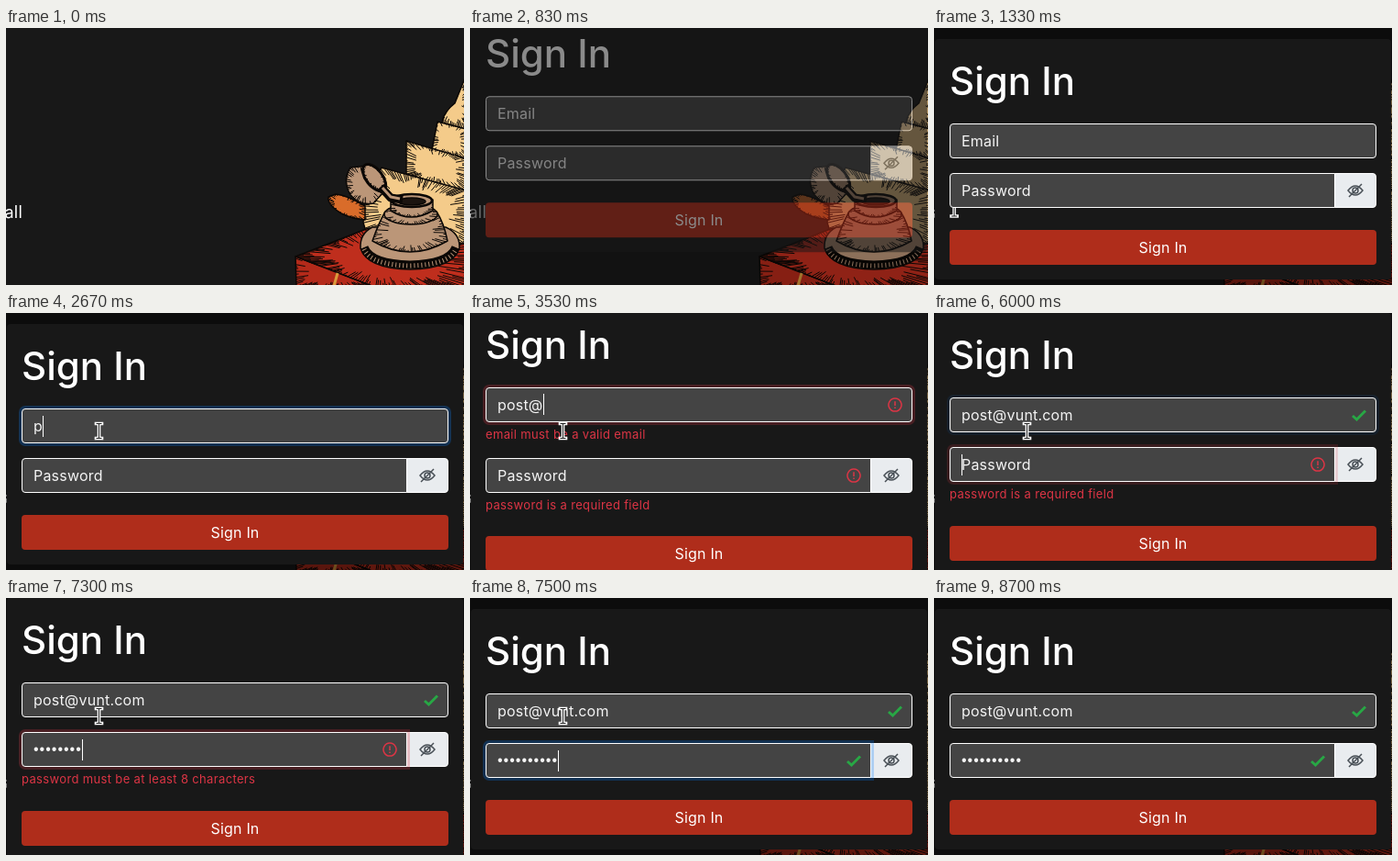
Recreate the animation shown at these times as an HTML page. Size 500 by 280 pixels, loop 9.13 s.

```html
<!DOCTYPE html>
<html lang="en">
<head>
<meta charset="utf-8">
<title>Sign In</title>
<style>
* { box-sizing: border-box; margin: 0 }
html, body { width: 100%; height: 100%; overflow: hidden; background: #181818 }
body { position: relative; font: 16px/24px Inter, sans-serif; letter-spacing: .2px; color: #f4f4f4 }
svg { display: block }
#art, #shade, #cursor { position: absolute; left: 0; top: 0 }
#all { position: absolute; right: calc(100% - 18px); top: 189px; font-size: 18px; color: #fff }
#shade { width: 500px; height: 280px; background: #000 }
#panel { position: absolute; left: 1px; width: 498px; padding: 0 16px 16px; background: #181818; border-radius: 4px }
h1 { font-size: 42px; font-weight: 500; line-height: 92px; letter-spacing: 0; color: #fff }
.field { position: relative; height: 38px; padding-left: 12px; display: flex; align-items: center;
  background: #444; border: 1px solid #fff; border-radius: 4px }
.field i { width: 1px; height: 23px; margin-right: -1px; background: #fff }
.field svg { position: absolute; top: 10px; right: 10px }
.empty i { order: -1 }
.row { display: flex }
.row .field { width: 421px; border-radius: 4px 0 0 4px; z-index: 1 }
#pass:not(.empty) span { font-family: "Liberation Sans", sans-serif; letter-spacing: 1px }
.eye { width: 46px; height: 38px; margin-left: -1px; padding: 8px 12px; background: #e9ecef;
  border: 1px solid #fff; border-radius: 0 4px 4px 0 }
.error { margin-top: 4px; font-size: 13px; line-height: 19.2px; letter-spacing: .35px; color: #dc3545 }
.gap { height: 16px }
button { display: block; width: 466px; height: 38px; margin-top: 24px; border: 0; border-radius: 4px;
  background: #af2d1b; color: #fff; font: inherit; letter-spacing: inherit }
</style>
</head>
<body>
<svg id="art" width="500" height="280" fill="none" stroke="#0b0806" stroke-width="1.5" stroke-linejoin="round">
  <g fill="#f4cb8a">
    <path class="ink" d="M502 52L490 82Q478 91 476 103L502 110Z"/>
    <path class="ink" d="M471 102L502 110V142L465 133Z"/>
    <path class="ink" d="M437 123L502 142V178L437 159Z"/>
    <path class="ink" d="M410 152L502 177V245H400L390 212L392 186Z"/>
  </g>
  <path class="ink" fill="#d96c2a" d="M352 184Q350 192 366 202Q378 208 392 209V194Q372 182 360 181Z"/>
  <path class="ink" fill="#bf2e1d" d="M316 249L396 218L502 235V282H402Z"/>
  <path class="ink" fill="#b42a1a" d="M316 249L402 282H317Z"/>
  <path stroke="#d99a3c" stroke-width="3" d="M362 267L358 281"/>
  <g fill="#bb9678">
    <path d="M400 217Q386 224 387 240Q394 262 441 263Q488 262 495 240Q496 224 480 217Z"/>
    <path stroke-width="9" d="M391 239Q398 257 441 258Q484 257 491 239"/>
    <path fill="none" stroke="#bb9678" stroke-width="5" stroke-dasharray="1 3" d="M391 241Q398 258 441 259Q484 258 491 241"/>
    <path class="ink" d="M414 200Q407 212 400 232Q441 256 482 232Q478 212 470 200Z"/>
    <ellipse class="ink" cx="442" cy="203" rx="29" ry="11"/>
    <path class="ink" d="M420 187V199Q442 213 466 199V187Z"/>
    <ellipse cx="443" cy="188" rx="22" ry="7" stroke-width="2.5"/>
    <ellipse cx="443" cy="189" rx="15" ry="4" fill="#1b1410"/>
    <path class="ink" d="M395 150L376 152Q367 166 376 182Q387 194 401 191L413 178Z"/>
    <ellipse class="ink" cx="402" cy="163" rx="9" ry="17" stroke-width="3" transform="rotate(-38 402 163)"/>
  </g>
  <path stroke-width="9" d="M409 173L420 185L433 187"/>
  <path stroke="#bb9678" stroke-width="3" d="M411 174L420 184L430 186"/>
</svg>
<div id="all">all</div>
<div id="shade"></div>
<div id="panel">
  <h1>Sign In</h1>
  <div class="field" id="mail"><span></span><i></i><svg width="16" height="16" fill="none"><path/></svg></div>
  <div class="error" id="mailError">email must be a valid email</div>
  <div class="gap"></div>
  <div class="row">
    <div class="field" id="pass"><span></span><i></i><svg width="16" height="16" fill="none"><path/></svg></div>
    <div class="eye"><svg width="20" height="20" fill="none" stroke="#495057" stroke-width="1.5">
      <path d="M2 10Q10 0 18 10Q10 20 2 10ZM3 17L17 3"/><circle cx="10" cy="10" r="3"/></svg></div>
  </div>
  <div class="error" id="passError"></div>
  <button>Sign In</button>
</div>
<svg id="cursor" width="500" height="280"><g id="beam">
  <path d="M-3 -8H3M0 -8V8M-3 8H3" stroke="#fff" stroke-width="3.6" stroke-linecap="square"/>
  <path d="M-3 -8H3M0 -8V8M-3 8H3" stroke="#222"/>
</g></svg>
<script>
const LOOP = 9130, ADDRESS = "post@vunt.com";
// Moments of the story, in ms
const OPEN = 755, MOVE = 1330, CLICK = 1870, CHECKED = 2700, MAIL_OK = 4930,
  NEXT = 5900, PASS_OK = 7330, SEND = 8330, REOPEN = 8400;
const CHECK = "M1 9L5.5 13L15 3.5", ALERT = "M8 1A7 7 0 1 1 7.99 1M8 4.2V9M8 10.6V12";

const el = id => document.getElementById(id);
const clamp = (v, lo, hi) => Math.min(hi, Math.max(lo, v));
const ramp = (t, from, span = 150) => clamp((t - from) / span, 0, 1);
const easeOut = (x, power) => 1 - (1 - x) ** power;
const within = (t, a, b) => t >= a && t < b;
const keys = (t, from, step, count) => clamp(Math.floor((t - from) / step) + 1, 0, count);

// Ink shading: uneven strokes from each outline towards the middle
let seed = 7;
const rand = () => (seed = seed * 16807 % 2147483647) / 2147483647;
for (const shape of document.querySelectorAll(".ink")) {
  const box = shape.getBBox(), hatch = shape.cloneNode();
  const cx = box.x + box.width / 2, cy = box.y + box.height / 2;
  let d = "";
  for (let s = 0; s < shape.getTotalLength(); s += 1.5 + 2 * rand()) {
    const p = shape.getPointAtLength(s), k = .35 * rand();
    d += `M${p.x} ${p.y}l${(cx - p.x) * k} ${(cy - p.y) * k}`;
  }
  const lines = document.createElementNS(shape.namespaceURI, "path");
  lines.setAttribute("d", d);
  lines.setAttribute("stroke-width", 1);
  lines.setAttribute("transform", shape.getAttribute("transform") || "");
  shape.after(lines);
}

function setField(id, value, hint, caret, checked, valid, blue, red) {
  const box = el(id), [span, bar, icon] = box.children, mark = icon.firstChild;
  box.classList.toggle("empty", !value);
  span.textContent = value || hint;
  bar.style.opacity = +caret;
  icon.style.display = checked ? "block" : "none";
  mark.setAttribute("d", valid ? CHECK : ALERT);
  mark.setAttribute("stroke", valid ? "#28a745" : "#dc3545");
  mark.setAttribute("stroke-width", valid ? 3 : 1.5);
  box.style.boxShadow = `0 0 0 3px rgba(0,123,255,${blue / 4}), 0 0 0 3px rgba(220,53,69,${red / 4})`;
}

function draw(t) {
  const checked = t >= CHECKED, sent = t >= SEND;
  const mailBad = checked && t < MAIL_OK, passBad = checked && t < PASS_OK;
  const wrong = ramp(t, CHECKED), right = ramp(t, MAIL_OK);
  const leave = ramp(t, NEXT), fixed = ramp(t, PASS_OK);

  // The address comes in three bursts: name, sign, domain
  const letters = keys(t, 2670, 167, 4) + keys(t, 3530, 1, 1) + keys(t, 4000, 178, 8);
  const dots = keys(t, 6500, 111, 10);
  setField("mail", ADDRESS.slice(0, letters), "Email", within(t, CLICK, 5530), checked, !mailBad,
    (t >= CLICK + 160) - wrong + right - leave, wrong - right);
  setField("pass", "•".repeat(dots), "Password", within(t, NEXT, SEND), checked, !passBad,
    sent ? 0 : fixed, leave - fixed);

  el("mailError").hidden = !mailBad;
  el("passError").hidden = !passBad;
  el("passError").textContent = dots ? "password must be at least 8 characters" : "password is a required field";

  // The dialog opens, closes when sent and opens again; the first opening stalls for a moment
  const closing = within(t, SEND, REOPEN);
  const age = sent ? t - REOPEN : within(t, 870, 1070) ? 870 - OPEN : t - OPEN;
  const fade = closing ? 1 - ramp(t, SEND, REOPEN - SEND) : ramp(age, 0);
  const slide = closing ? 0 : 50 * (easeOut(ramp(age, 0, 300), 1.78) - 1);
  const panel = el("panel").style;
  panel.top = 12 - 11.6 * (mailBad + passBad) + "px";
  panel.transform = slide ? `translateY(${slide}px)` : "none";
  panel.opacity = fade;
  el("shade").style.opacity = fade / 2;

  const go = easeOut(ramp(t, MOVE, 270), 2);
  el("cursor").style.display = within(t, MOVE, SEND) ? "block" : "none";
  el("beam").setAttribute("transform", `translate(${21.5 + 80 * go} ${197.5 - 69 * go})`);
}

const start = performance.now();
(function tick() {
  draw((performance.now() - start) % LOOP);
  requestAnimationFrame(tick);
})();
</script>
</body>
</html>
```
